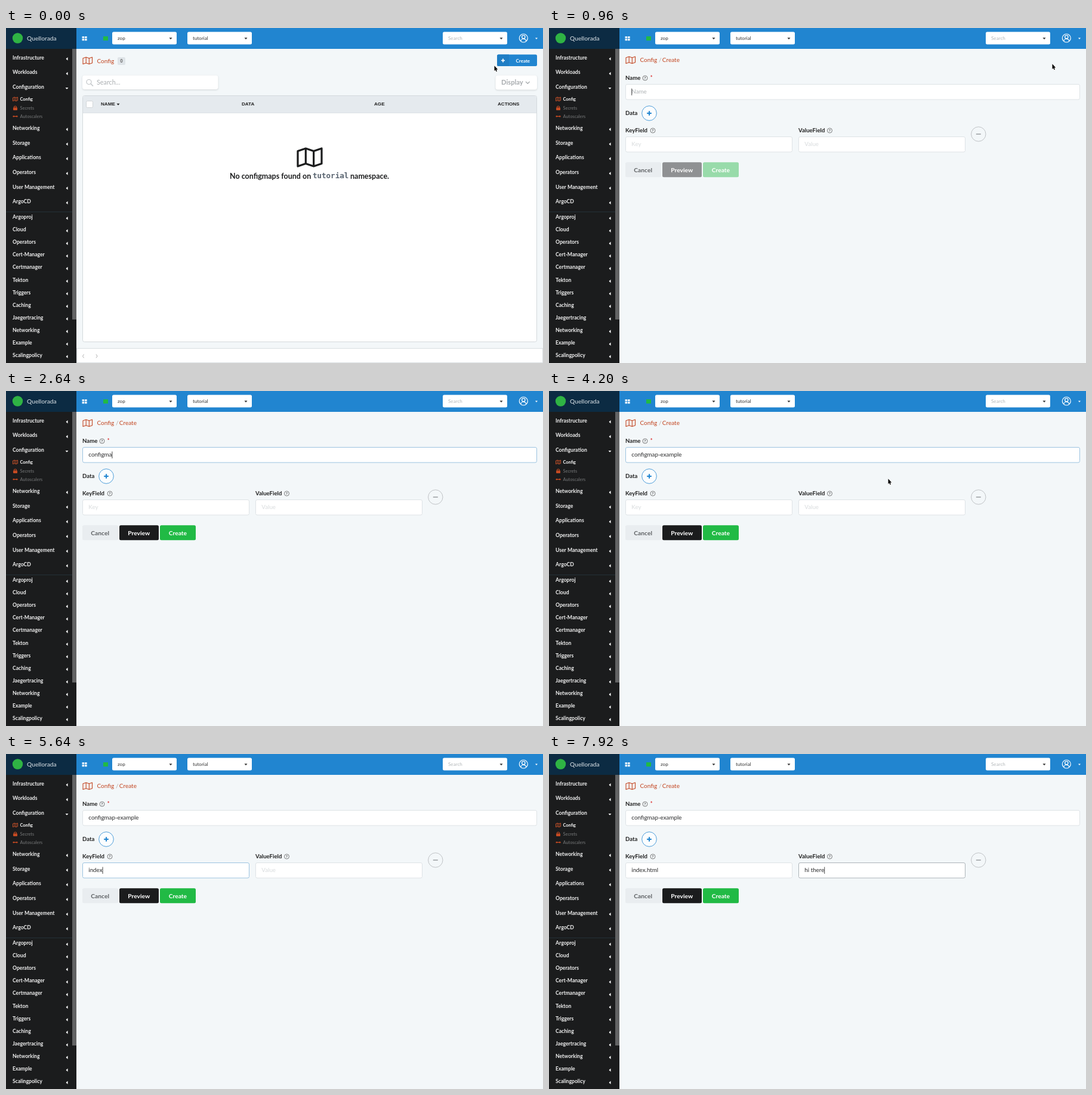
An HTML page with a canvas that plays this animation: 900x562 px, repeating every 8 s.

```html
<!DOCTYPE html>
<html lang="en">
<head>
<meta charset="utf-8">
<title>Create a configmap</title>
<style>
html, body { margin: 0; width: 100%; height: 100%; overflow: hidden; background: #f3f7f9; }
canvas { display: block; width: 900px; height: 562px; }
</style>
</head>
<body>
<canvas id="stage"></canvas>
<script>
const W = 900, H = 562, LOOP = 8000, STEP = 120;
const BLUE = '#2185d0', DARK = '#1b1c1d', RUST = '#c2441f', PAGE = '#f3f7f9';
const LATO = 'Lato, sans-serif', SANS = '"Liberation Sans", sans-serif', MONO = '"DejaVu Sans Mono", monospace';
const canvas = document.getElementById('stage');
const ctx = canvas.getContext('2d');
const dpr = window.devicePixelRatio || 1;
canvas.width = W * dpr;
canvas.height = H * dpr;

const MENU = [['Infrastructure', 50], ['Workloads', 74.7], ['Configuration', 99.4], ['Networking', 168.3],
  ['Storage', 193], ['Applications', 217.5], ['Operators', 242.2], ['User Management', 266.9], ['ArgoCD', 291.5]];
['Argoproj', 'Cloud', 'Operators', 'Cert-Manager', 'Certmanager', 'Tekton', 'Triggers', 'Caching',
  'Jaegertracing', 'Networking', 'Example', 'Scalingpolicy'].forEach((name, i) => MENU.push([name, 317.4 + i * 21.1]));

function rect(x, y, w, h, color) {
  ctx.fillStyle = color;
  ctx.fillRect(x, y, w, h);
}

function box(x, y, w, h, r, fill, stroke) {
  ctx.beginPath();
  ctx.roundRect(x, y, w, h, r);
  if (fill) { ctx.fillStyle = fill; ctx.fill(); }
  if (stroke) { ctx.strokeStyle = stroke; ctx.lineWidth = 1; ctx.stroke(); }
}

function text(s, x, y, size, color, weight = 400, family = LATO) {
  ctx.font = `${weight} ${size}px ${family}`;
  ctx.fillStyle = color;
  ctx.fillText(s, x, y);
}

function trace(points, close) {
  ctx.beginPath();
  points.forEach(([x, y], i) => i ? ctx.lineTo(x, y) : ctx.moveTo(x, y));
  if (close) ctx.closePath();
}

function poly(points, color) {
  trace(points, true);
  ctx.fillStyle = color;
  ctx.fill();
}

function line(points, color, width = 1) {
  trace(points, false);
  ctx.strokeStyle = color;
  ctx.lineWidth = width;
  ctx.stroke();
}

function ring(x, y, r, color, width = 1, fill) {
  ctx.beginPath();
  ctx.arc(x, y, r, 0, 7);
  if (fill) { ctx.fillStyle = fill; ctx.fill(); }
  ctx.strokeStyle = color;
  ctx.lineWidth = width;
  ctx.stroke();
}

function dot(x, y, r, color) {
  ctx.beginPath();
  ctx.arc(x, y, r, 0, 7);
  ctx.fillStyle = color;
  ctx.fill();
}

const down = (x, y, color, s = 2.5) => poly([[x - s, y - s / 2], [x + s, y - s / 2], [x, y + s / 2 + .4]], color);
const left = (x, y, color) => poly([[x + 1.5, y - 2.8], [x + 1.5, y + 2.8], [x - 1.5, y]], color);

function plus(x, y, s, color, width) {
  line([[x - s, y], [x + s, y]], color, width);
  line([[x, y - s], [x, y + s]], color, width);
}

function mapIcon(x, y, w, h, color, width) {
  const a = x + w / 3, b = x + w * 2 / 3, r = x + w, top = y + h * .15, low = y + h * .85;
  ctx.lineJoin = 'round';
  trace([[x, top], [a, y], [b, top], [r, y], [r, low], [b, y + h], [a, low], [x, y + h]], true);
  ctx.strokeStyle = color;
  ctx.lineWidth = width;
  ctx.stroke();
  line([[a, y], [a, low]], color, width);
  line([[b, top], [b, y + h]], color, width);
}

function help(x, y) {
  ring(x, y, 4, '#555', .75);
  text('?', x - 1.5, y + .3, 6.3, '#333', 700);
}

function sidebar() {
  rect(0, 35, 118, H - 35, DARK);
  rect(0, 0, 118, 35, '#0c2b43');
  dot(19.5, 17, 8.7, '#2fb344');
  text('Quellorada', 35, 17.5, 10.3, '#dfe5e9');
  rect(0, 308, 111, 1, '#233038');
  rect(111, 35, 7, 454, '#626364');
  for (const [name, y] of MENU) {
    text(name, 11, y, 8.65, '#f2f2f2', 700);
    if (name === 'Configuration') down(102, y + 1.8, '#fff');
    else left(102, y + 1.8, '#fff');
  }
  mapIcon(11.5, 116, 8, 6.5, '#d3552b', .9);
  text('Config', 23.5, 119.7, 7.4, '#fff', 700);
  box(12, 133.3, 7, 4.6, 1, '#c54a22');
  ctx.beginPath();
  ctx.arc(15.5, 133, 2, Math.PI, 0);
  ctx.strokeStyle = '#c54a22';
  ctx.lineWidth = 1.2;
  ctx.stroke();
  text('Secrets', 23.5, 134.3, 7.4, '#77797a');
  line([[12, 148.3], [19, 148.3]], '#c54a22', 1.4);
  dot(12.8, 148.3, 1.3, '#c54a22');
  dot(18.2, 148.3, 1.3, '#c54a22');
  text('Autoscalers', 23.5, 148.7, 7.4, '#77797a');
}

function select(x, label, color) {
  box(x, 6.5, 108, 21, 2.5, '#fff');
  text(label, x + 9, 17.8, 8.1, color);
  down(x + 98, 17.5, '#333');
}

function topbar() {
  rect(118, 0, W - 118, 35, BLUE);
  for (const x of [127.5, 132]) for (const y of [14, 18]) box(x, y, 3.7, 3.3, .6, '#e8f2fa');
  rect(163, 14, 8, 7, '#21ba45');
  select(178, 'zop', '#333');
  select(304, 'tutorial', '#333');
  select(732, 'Search', '#b4b8bb');
  ring(867.3, 17, 7, '#fff', 1.2);
  ring(867.3, 15, 2.7, '#fff', 1.2);
  ctx.beginPath();
  ctx.arc(867.3, 23, 4.7, Math.PI * 1.08, Math.PI * 1.92);
  ctx.stroke();
  down(889, 17.5, '#fff', 2);
}

function listPage(hover) {
  mapIcon(129, 49, 15.5, 11.5, RUST, 1.1);
  text('Config', 152.5, 55.5, 10, RUST);
  box(187, 49, 13, 13, 2, '#dfe4e8');
  text('0', 191.5, 56, 7, '#555', 700);
  box(823, 44.5, 67, 19.5, 2.5, hover ? '#1e7fc9' : BLUE);
  box(823, 44.5, 20, 19.5, [2.5, 0, 0, 2.5], hover ? '#17639d' : '#1f7ec5');
  plus(833, 54.5, 3, '#fff', 1.7);
  text('Create', 854.5, 55.2, 8, '#fff', 700);

  ctx.shadowColor = 'rgba(34,36,38,.16)';
  ctx.shadowBlur = 3 * dpr;
  ctx.shadowOffsetY = dpr;
  box(128, 79.5, 227.5, 23.5, 4, '#fff');
  box(820.5, 79.5, 69.5, 24, 4, '#fff');
  ctx.shadowColor = 'transparent';
  ring(139, 90.5, 4, '#bfc3c6', 1.2);
  line([[142, 93.5], [146, 97.5]], '#bfc3c6', 1.4);
  text('Search...', 152, 91.5, 10.8, '#a9adb0');
  text('Display', 830, 91.3, 11.2, '#a7abae', 700);
  line([[871, 90], [874.3, 93.3], [877.6, 90]], '#a7abae', 1.3);

  box(128.5, 113.5, 761, 413, 3, '#fff', '#d4d9dc');
  box(129, 114, 760, 28.5, [3, 3, 0, 0], '#e5eaee');
  rect(129, 142, 760, 1, '#dde2e6');
  box(134.5, 122.5, 11, 11, 2, '#fff', '#d0d4d7');
  for (const [s, x, y] of [['NAME', 159, 128], ['DATA', 395, 128], ['AGE', 617, 128], ['ACTIONS', 824, 127.5]])
    text(s, x, y, 8.1, '#222', 700, SANS);
  down(188, 128, '#222');
  mapIcon(489, 202, 40, 30, DARK, 3.2);
  text('No configmaps found on', 375, 249, 12.5, DARK, 700);
  text('tutorial', 514, 249, 12.5, '#596470', 700, MONO);
  text('namespace.', 577, 249, 12.5, DARK, 700);
  rect(118, 537, W - 118, 25, '#d9dee1');
  rect(119, 538, W - 120, 23, '#fff');
  line([[130.5, 547.5], [128.5, 550.5], [130.5, 553.5]], '#999', .8);
  line([[151, 547.5], [153, 550.5], [151, 553.5]], '#999', .8);
}

function mix(a, b, p) {
  return `rgb(${a.map((v, i) => Math.round(v + (b[i] - v) * p))})`;
}

const ramp = (t, from, span) => Math.max(0, Math.min(1, (t - from) / span));

// Each field has focus from `focus` to `blur` and is typed from `first` to `last`.
const FIELDS = [
  { x: 128, y: 94, w: 762, hint: 'Name', tone: '#aeb2b5', value: 'configmap-example', focus: 960, blur: 4800, first: 1680, last: 3600,
    count: t => t < 1680 ? 0 : t < 1920 ? 1 : t <= 2640 ? 2 + Math.floor((t - 1920) / STEP) : Math.min(17, 8 + Math.ceil((t - 2640) / STEP * 9 / 8)) },
  { x: 128, y: 182, w: 280, hint: 'Key', tone: '#d9dcde', value: 'index.html', focus: 4800, blur: 6720, first: 5160, last: 6240 },
  { x: 418, y: 182, w: 280, hint: 'Value', tone: '#d9dcde', value: 'hi there', focus: 6720, blur: LOOP, first: 7080, last: 7920 }
];

function field(f, t) {
  const count = f.count ? f.count(t) : Math.max(0, Math.min(f.value.length, Math.floor((t - f.first) / STEP) + 1));
  const glow = ramp(t, f.focus, 240) * (1 - ramp(t, f.blur - 1, 120));
  const lit = f.hint === 'Value' ? [172, 179, 184] : [156, 195, 224];
  box(f.x + .5, f.y + .5, f.w - 1, 25.5, 2.5, '#fff', mix([222, 227, 230], lit, glow));
  const shown = f.value.slice(0, count);
  text(shown || f.hint, f.x + 10.3, f.y + 13.5, 9.8, shown ? '#2b2c2d' : f.tone);
  if (t < f.focus || t >= f.blur) return;
  const since = t - (t >= f.last ? f.last : t >= f.first ? t : f.focus);
  if (Math.floor(since / 500) % 2) return;
  const width = shown ? ctx.measureText(shown).width : 0;
  rect(f.x + 10.3 + width, f.y + 7.5, .9, 11.5, '#333');
}

function button(x, w, label, tx, fill, color) {
  box(x, 225.2, w, 25, 2.5, fill);
  text(label, tx, 238.4, 10.25, color, 700);
}

function formPage(t) {
  mapIcon(129, 48, 15.5, 11.5, RUST, 1.1);
  text('Config', 152.5, 54, 10, RUST);
  text('/', 184, 54, 10, '#b5a49e');
  text('Create', 189.8, 54, 10, RUST);
  text('Name', 128, 84.5, 9.6, '#222', 700);
  help(161, 84);
  text('*', 169.8, 83.5, 9, '#db2828', 700);
  text('Data', 128, 143.5, 9.6, '#222', 700);
  ring(168, 143, 12.3, '#3a92d5', .9, '#fbfdfe');
  plus(168, 143, 3.8, BLUE, 2);
  text('KeyField', 128, 172.5, 9.6, '#222', 700);
  help(174, 172);
  text('ValueField', 418, 172.5, 9.6, '#222', 700);
  help(470.5, 172);
  ring(719.8, 178, 12.2, '#b9bdc0', .9);
  line([[715.8, 178], [723.8, 178]], '#999da0', 1.5);
  FIELDS.forEach(f => field(f, t));
  const ready = t >= 1680;
  button(128, 60, 'Cancel', 142.3, '#e9edf0', '#5d6063');
  button(190, 66, 'Preview', 204.3, ready ? DARK : '#8f9193', '#fff');
  button(258, 60, 'Create', 272.8, ready ? '#21ba45' : '#98dbaa', '#fff');
}

const smooth = p => p * p * (3 - 2 * p);

function pointer(t) {
  if (t < 3840) {
    const p = smooth(ramp(t, 120, 600));
    return { x: 818 + 25 * p, y: 63 - 3 * p, shown: t < 1680 };
  }
  const p = smooth(ramp(t, 3840, 720)), q = 1 - p;
  return { x: 843 - 550 * p, y: 60 * q * q + 332 * p * q + 196 * p * p, shown: t >= 3960 && t < 5160 };
}

function drawPointer(x, y, kind) {
  ctx.save();
  ctx.translate(x, y);
  ctx.lineJoin = 'round';
  if (kind === 'text') {
    line([[-2, -5.5], [0, -4.5], [2, -5.5]], '#222', .9);
    line([[0, -4.5], [0, 4.5]], '#222', .9);
    line([[-2, 5.5], [0, 4.5], [2, 5.5]], '#222', .9);
  } else {
    const hand = kind === 'hand';
    if (hand) {
      ctx.beginPath();
      ctx.moveTo(-2, 6.5);
      ctx.lineTo(-2, .8);
      ctx.quadraticCurveTo(-1, -1, 0, .8);
      ctx.lineTo(0, 4);
      ctx.quadraticCurveTo(1.4, 2.6, 2, 4.3);
      ctx.quadraticCurveTo(3.4, 3, 4, 4.8);
      ctx.quadraticCurveTo(5.8, 4, 5.6, 6);
      ctx.lineTo(5, 9);
      ctx.lineTo(4, 11.4);
      ctx.lineTo(-1, 11.4);
      ctx.lineTo(-4.4, 7.2);
      ctx.quadraticCurveTo(-4.2, 5, -2, 6.5);
      ctx.closePath();
    } else {
      trace([[.5, .3], [.5, 9], [2.3, 7.3], [3.6, 10.2], [5, 9.6], [3.7, 6.7], [6.2, 6.5]], true);
    }
    ctx.strokeStyle = hand ? '#111' : '#fff';
    ctx.lineWidth = hand ? 1 : 1.4;
    ctx.fillStyle = hand ? '#fff' : '#000';
    ctx.stroke();
    ctx.fill();
  }
  ctx.restore();
}

function draw(now) {
  const t = Math.floor(now % LOOP / STEP) * STEP;
  ctx.setTransform(dpr, 0, 0, dpr, 0, 0);
  ctx.textBaseline = 'middle';
  rect(0, 0, W, H, PAGE);
  sidebar();
  topbar();
  const mouse = pointer(t), list = t < 960;
  const hover = list && mouse.x >= 823;
  if (list) listPage(hover);
  else formPage(t);
  const overKey = mouse.y >= 182 && mouse.x < 408;
  if (mouse.shown) drawPointer(mouse.x, mouse.y, hover ? 'hand' : overKey ? 'text' : 'arrow');
  requestAnimationFrame(draw);
}
requestAnimationFrame(draw);
</script>
</body>
</html>
```
